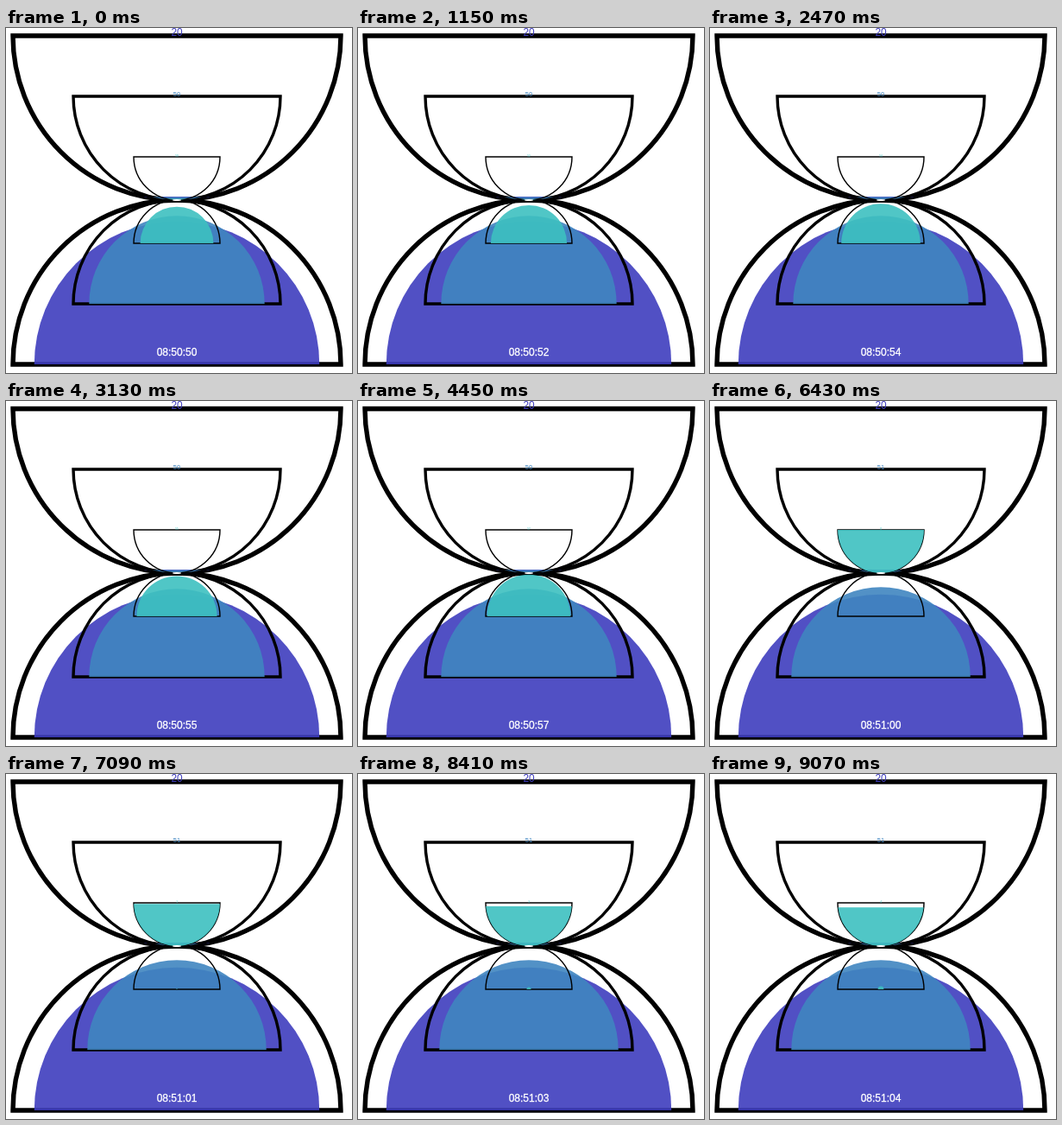
An HTML page for the animation above (9570 ms loop, 401 by 399 pixels).

```html
<!DOCTYPE html>
<html lang="en">
<head>
<meta charset="utf-8">
<title>Hourglass clock</title>
<style>
  html, body { margin: 0; width: 100%; height: 100%; overflow: hidden; background: #fff; }
  svg { display: block; width: 100%; height: 100%; }
  text { font-family: "Liberation Sans", Arial, sans-serif; text-anchor: middle; }
</style>
</head>
<body>
<svg id="stage" viewBox="0 0 401 399"></svg>
<script>
const LOOP = 9570, FIRST = 490, TICK = 660;
const START = (20 * 60 + 50) * 60 + 50;
const CX = 198, NECK = 199;
const stage = document.getElementById('stage');

function add(tag, attrs) {
  const el = document.createElementNS('http://www.w3.org/2000/svg', tag);
  for (const k in attrs) el.setAttribute(k, attrs[k]);
  return stage.appendChild(el);
}

// Sand left in the upper bowl: a chord segment starting at angle a
function bowl(r, a) {
  const x = r * Math.cos(a), y = NECK - r + r * Math.sin(a);
  return `M${CX + x} ${y}A${r} ${r} 0 0 1 ${CX - x} ${y}Z`;
}

// Half disc of radius s resting on the base of a glass of radius r
function dome(r, s) {
  const y = NECK + r;
  return `M${CX - s} ${y}A${s} ${s} 0 0 1 ${CX + s} ${y}Z`;
}

function makeGlass(r, max, color) {
  const line = { fill: 'none', stroke: '#000', 'stroke-width': r / 35 };
  const sand = { fill: color, 'fill-opacity': 0.9 };
  add('path', { ...line, d: bowl(r, 0) });
  add('path', { ...line, d: dome(r, r) });
  const top = add('path', sand);
  if (r === 50) add('ellipse', { cx: CX, cy: NECK, rx: 5, ry: 1.1, fill: '#fff' });
  const bottom = add('path', sand);
  const label = add('text', { x: CX, y: NECK - r, 'font-size': r / 16, fill: color });
  return value => {
    const part = value / max;
    top.setAttribute('d', bowl(r, part * Math.PI / 2));
    bottom.setAttribute('d', dome(r, part * r));
    label.textContent = value;
  };
}

const setHour = makeGlass(190, 23, 'rgb(63,61,190)');
const setMinute = makeGlass(120, 59, 'rgb(64,133,192)');
const setSecond = makeGlass(50, 59, 'rgb(62,192,192)');
const clock = add('text', {
  x: CX, y: 379.3, 'font-size': 12, fill: '#fff', stroke: '#fff', 'stroke-width': 0.3
});

const pad = n => String(n).padStart(2, '0');
let shown = -1;

function draw(ms) {
  const t = ms % LOOP;
  const now = START + (t < FIRST ? 0 : 1 + Math.floor((t - FIRST) / TICK));
  if (now === shown) return;
  shown = now;
  const h = Math.floor(now / 3600), m = Math.floor(now / 60) % 60, s = now % 60;
  setHour(h);
  setMinute(m);
  setSecond(s);
  clock.textContent = [h % 12, m, s].map(pad).join(':');
}

const begin = performance.now();
function loop() {
  draw(performance.now() - begin);
  requestAnimationFrame(loop);
}
loop();
</script>
</body>
</html>
```
